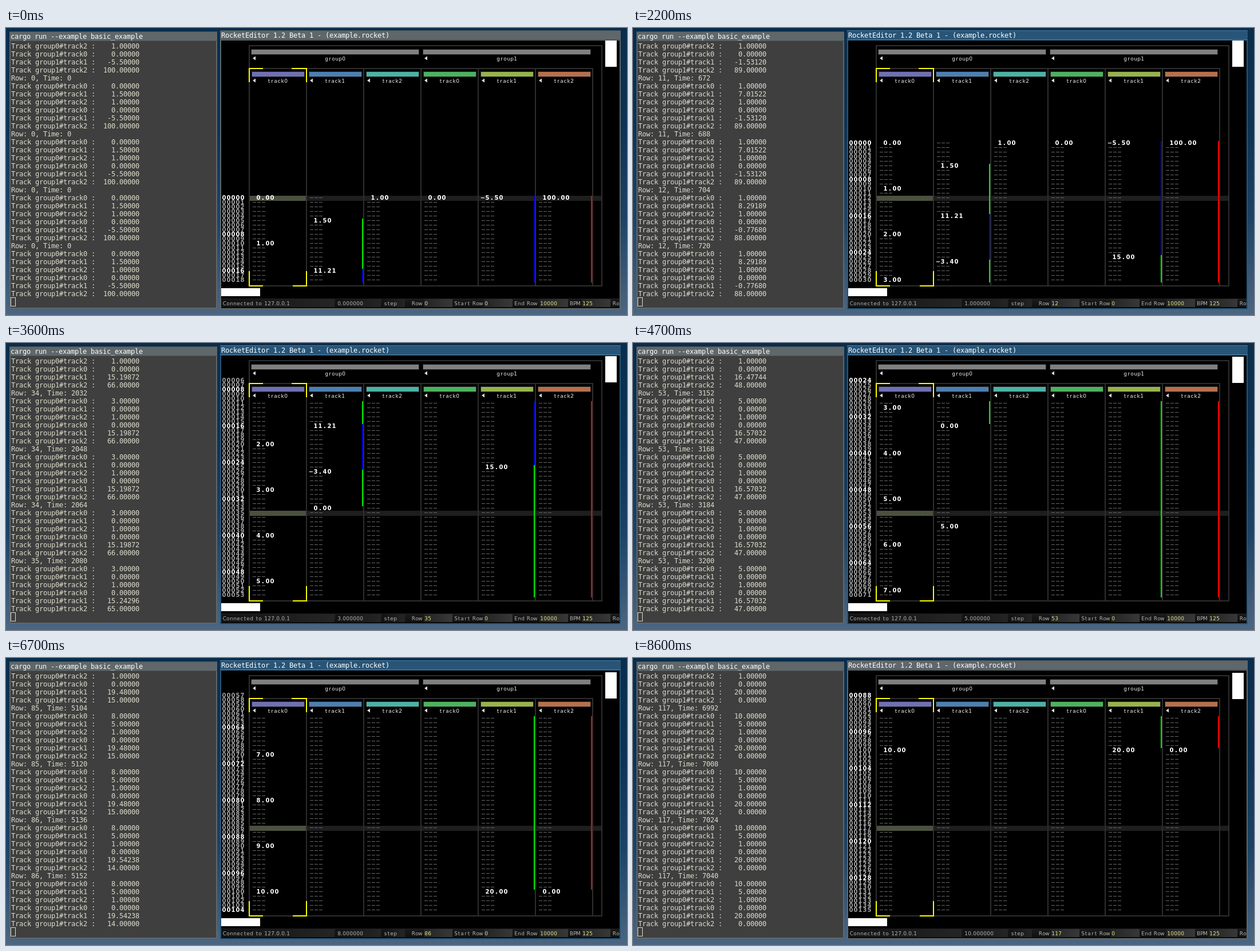
An HTML page with a canvas that plays this animation: 1085x503 px, repeating every 8700 ms.

```html
<!DOCTYPE html>
<html lang="en">
<head>
<meta charset="utf-8">
<title>Track editor</title>
<style>
html, body { margin: 0; width: 100%; height: 100%; overflow: hidden; background: #0a2f50; }
canvas { display: block; width: 1085px; height: 503px; }
</style>
</head>
<body>
<canvas id="stage" width="1085" height="503"></canvas>
<script>
const ctx = document.getElementById('stage').getContext('2d');
const LOOP = 8700, STEP = 100;
const TERM_FONT = '12px "DejaVu Sans Mono", monospace';
const UI_FONT = '9px "DejaVu Sans", sans-serif';
const NUM_FONT = 'bold 10px "DejaVu Sans", sans-serif';

const CURSOR_Y = 294, ROW_H = 8, ROWS_UP = 24, ROWS_DOWN = 18, LABELS_UP = 29;
const LEFT = 425, COL_W = 100;

const EASE = {
  step: () => 0,
  linear: t => t,
  smooth: t => t * t * (3 - 2 * t),
  ramp: t => t * t
};
const LINE_COLOR = { linear: '#f80000', smooth: '#00ee00', ramp: '#0000d8' };

const key = (row, value, type = 'step') => ({ row, value, type });
const tracks = [
  { group: 0, color: '#7070b4', keys: Array.from({ length: 11 }, (_, i) => key(i * 10, i)) },
  { group: 0, color: '#4c80b2', keys: [key(5, 1.5, 'smooth'), key(16, 11.21, 'ramp'),
    key(26, -3.4, 'smooth'), key(34, 0), key(56, 5)] },
  { group: 0, color: '#4cb2a6', keys: [key(0, 1)] },
  { group: 1, color: '#4cb25c', keys: [key(0, 0)] },
  { group: 1, color: '#98b24c', keys: [key(0, -5.5, 'ramp'), key(25, 15, 'smooth'), key(100, 20)] },
  { group: 1, color: '#b8704c', keys: [key(0, 100, 'linear'), key(100, 0)] }
];
tracks.forEach((t, i) => { t.name = 'track' + i % 3; });

function valueAt({ keys }, row) {
  const i = keys.findLastIndex(k => k.row <= row);
  if (i < 0) return keys[0].value;
  const a = keys[i], b = keys[i + 1];
  if (!b) return a.value;
  const t = (row - a.row) / (b.row - a.row);
  return a.value + (b.value - a.value) * EASE[a.type](t);
}

// Playback clock: stage time to song time, advancing in 16 ms ticks
const clock = [[1500, 48], [2200, 720], [3600, 2080], [4700, 3200], [5500, 3952], [6700, 5152], [8600, 7040]];
function songTime(ms) {
  if (ms < clock[0][0]) return 0;
  const i = Math.max(1, clock.findIndex(c => c[0] >= ms));
  const [x0, y0] = clock[i - 1], [x1, y1] = clock[i];
  return Math.round((y0 + (y1 - y0) * (ms - x0) / (x1 - x0)) / 16) * 16;
}
const rowAt = time => Math.round(time / 60);

function rect(x, y, w, h, color) {
  ctx.fillStyle = color;
  ctx.fillRect(x, y, w, h);
}

function gradient(x0, y0, x1, y1, ...colors) {
  const g = ctx.createLinearGradient(x0, y0, x1, y1);
  colors.forEach((c, i) => g.addColorStop(i / (colors.length - 1), c));
  return g;
}

// Text on a pixel grid: each character sits in a cell of whole pixels
function grid(str, x, y, cellOf, font, color, align) {
  ctx.font = font;
  ctx.fillStyle = color;
  ctx.textAlign = align;
  for (const ch of str) {
    const w = cellOf(ch);
    if (ch !== ' ') ctx.fillText(ch, align === 'center' ? x + w / 2 : x, y);
    x += w;
  }
}
const uiCell = ch => ({ ' ': 4, '.': 3, t: 5 })[ch] || 6;
const termText = (s, x, y, c) => grid(s, x, y, () => 7, TERM_FONT, c, 'left');
const uiText = (s, x, y, c) => grid(s, x, y, uiCell, UI_FONT, c, 'center');
const numText = (s, x, y, c) => grid(s.replace('-', '\u2212'), x, y, () => 8, NUM_FONT, c, 'center');

function frameWindow(x, y, w, h, title, focused) {
  const edge = focused ? '#4c7899' : '#4a5254';
  rect(x, y, w, h, focused ? '#285577' : '#5f676a');
  rect(x, y, w, 1, edge);
  rect(x, y + 16, w, 1, edge);
  termText(title, x + 2, y + 13, '#ffffff');
}

function drawTerminal(time, focused) {
  frameWindow(6, 6, 363, 486, 'cargo run --example basic_example', focused);
  rect(8, 23, 359, 467, '#3f3f3f');
  const lines = [];
  for (let back = 4; back >= 0; back--) {
    const t = Math.max(0, time - back * 16), row = rowAt(t);
    lines.push(`Row: ${row}, Time: ${t}`);
    for (const tr of tracks) {
      lines.push(`Track group${tr.group}#${tr.name} :` + valueAt(tr, row).toFixed(5).padStart(11));
    }
  }
  lines.slice(-32).forEach((s, i) => termText(s, 9, 36 + i * 14, '#dcdccc'));
  ctx.strokeStyle = '#dcdccc';
  ctx.lineWidth = 1;
  if (focused) rect(8, 472, 9, 16, '#dcdccc');
  else ctx.strokeRect(8.5, 472.5, 8, 15);
}

function headerBar(x, y, w, color, label, center) {
  rect(x - 1, y - 1, w + 2, 10, '#262626');
  rect(x, y, w, 8, color);
  const tip = center.arrow, ay = y + 15;
  ctx.fillStyle = '#e0e0e0';
  ctx.beginPath();
  ctx.moveTo(tip, ay);
  ctx.lineTo(tip + 5, ay - 3.5);
  ctx.lineTo(tip + 5, ay + 3.5);
  ctx.fill();
  uiText(label, center.label, y + 19, '#f0f0f0');
}

function drawHeaders() {
  for (const g of [0, 1]) {
    const x = LEFT + g * 3 * COL_W;
    headerBar(x + 4, 38, 292, '#808080', 'group' + g, { arrow: x + 6, label: x + 132 });
  }
  tracks.forEach((t, n) => {
    const x = LEFT + n * COL_W;
    headerBar(x + 5, 77, 91, t.color, t.name, { arrow: x + 6, label: x + 32 });
  });
}

function drawOutlines() {
  const c = '#2e2e2e';
  rect(424, 30, 618, 2, c);
  rect(424, 451, 618, 2, c);
  rect(424, 30, 2, 423, c);
  rect(1040, 30, 2, 423, c);
  rect(424, 70, 602, 2, c);
  for (let i = 1; i <= 6; i++) rect(424 + i * COL_W, 70, 2, 383, c);
}

function drawSelection() {
  const c = '#ffff00';
  for (const y of [70, 451]) {
    rect(424, y, 25, 2, c);
    rect(y === 70 ? 499 : 501, y, y === 70 ? 27 : 25, 2, c);
  }
  for (const x of [424, 524]) {
    rect(x, 70, 2, 25, c);
    rect(x, 426, 2, 27, c);
  }
}

function drawCursorRow() {
  rect(LEFT, CURSOR_Y, 616, 9, '#1e1e1e');
  rect(LEFT, CURSOR_Y, 99, 9, '#4b5040');
  rect(506, 299, 1, 3, '#00a000');
}

function drawRows(current) {
  const topOf = row => CURSOR_Y + (row - current) * ROW_H;
  const first = Math.max(0, current - ROWS_UP), last = current + ROWS_DOWN;

  for (let row = Math.max(0, current - LABELS_UP); row <= last; row++) {
    numText(String(row).padStart(5, '0'), 377, topOf(row) + 7, row % 8 ? '#a0a0a0' : '#ffffff');
  }

  tracks.forEach((track, n) => {
    const x = LEFT + n * COL_W;
    for (let row = first; row <= last; row++) {
      const k = track.keys.find(k => k.row === row);
      if (k) {
        const sign = k.value < 0 ? '' : ' ';
        numText(sign + k.value.toFixed(2), x + 4, topOf(row) + 7, '#ffffff');
      } else if (n || row !== current) {
        for (let d = 0; d < 3; d++) rect(x + 6 + d * 8, topOf(row) + 3, 6, 1, '#686868');
      }
    }
    track.keys.forEach((k, i) => {
      const next = track.keys[i + 1];
      if (!next || k.type === 'step') return;
      const top = topOf(Math.max(k.row, current - ROWS_UP));
      const end = topOf(Math.min(next.row, last + 1));
      if (end > top) rect(x + 97, top, 2, end - top, LINE_COLOR[k.type]);
    });
  });
}

function drawStatus(row) {
  rect(376, 474, 696, 16, gradient(0, 474, 0, 490, '#1c1c1c', '#101010'));
  for (const [x, w] of [[376, 198], [576, 79], [657, 40]]) {
    rect(x, 475, w, 14, gradient(x, 0, x + w, 0, '#131313', '#252525'));
  }
  const grey = '#b4b4b4', yellow = '#e8e88c';
  uiText('Connected to 127.0.0.1', 379, 486, grey);
  uiText(valueAt(tracks[0], row).toFixed(6), 579, 486, grey);
  uiText('step', 660, 486, grey);
  const fields = [['Row', 709, 730, row], ['Start Row', 783, 835, 0], ['End Row', 888, 932, 10000], ['BPM', 985, 1006, 125]];
  for (const [label, x, fx, value] of fields) {
    rect(fx, 475, 50, 14, gradient(fx, 0, fx + 50, 0, '#242424', '#383838'));
    uiText(label, x, 486, grey);
    uiText(String(value), fx + 1, 486, yellow);
  }
  uiText('Ro', 1060, 486, grey);
}

function drawEditor(time, focused) {
  const row = rowAt(time);
  frameWindow(374, 4, 700, 489, 'RocketEditor 1.2 Beta 1 - (example.rocket)', focused);
  rect(376, 22, 696, 469, '#000000');
  drawCursorRow();
  drawOutlines();
  drawRows(row);
  drawHeaders();
  drawSelection();
  rect(1047, 22 + Math.floor(row / 24), 20, 46, '#ffffff');
  rect(376, 456, 68, 14, '#ffffff');
  drawStatus(row);
}

function draw(ms) {
  const time = songTime(ms);
  rect(0, 0, 1085, 503, gradient(0, 0, 0, 503, '#0a2d4c', '#0c3355', '#1c4366', '#4c6682'));
  drawTerminal(time, ms >= 800 && ms < 1000);
  drawEditor(time, ms >= 1000 && ms < 8600);
}

const start = performance.now();
let shown = -1;
function tick() {
  const ms = (performance.now() - start) % LOOP;
  const step = Math.floor(ms / STEP) * STEP;
  if (step !== shown) draw(shown = step);
  requestAnimationFrame(tick);
}
tick();
</script>
</body>
</html>
```
